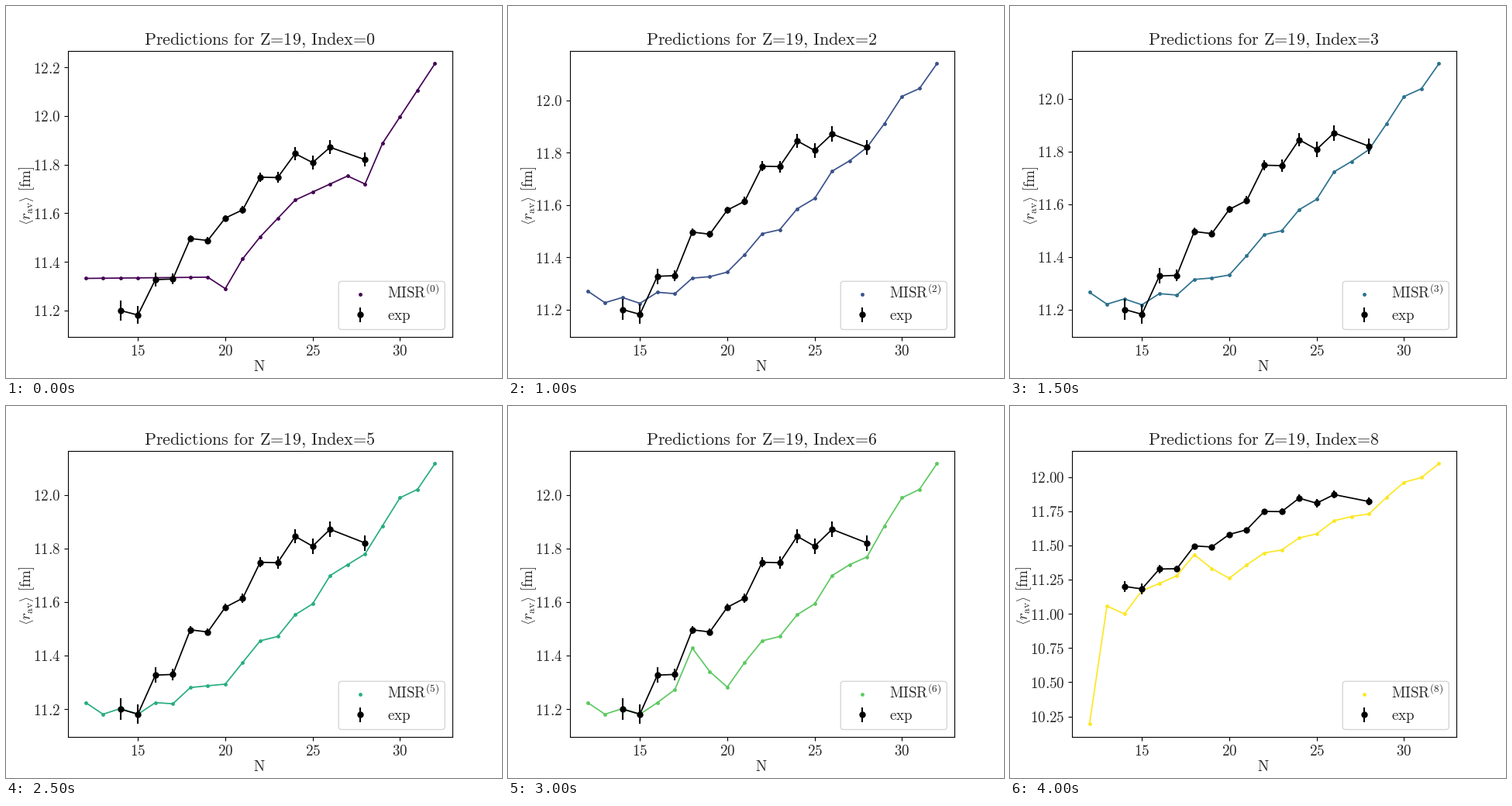
A matplotlib script that plays this animation: 640 px wide and 480 px high, repeating every 4500 ms.

```python
import numpy as np
import matplotlib.pyplot as plt
from matplotlib.animation import FuncAnimation
from matplotlib.patches import FancyBboxPatch

INK = "0.15"  # softens the heavy rendering of the type
plt.rcParams.update({
    "font.size": 13.7, "mathtext.fontset": "cm", "text.color": INK,
    "xtick.labelcolor": INK, "ytick.labelcolor": INK,
    "lines.linewidth": 1.25,
})

W, H, DPI = 640, 480, 100
STEPS, INTERVAL = 9, 500
N = np.arange(12, 33)
MAGIC = (20, 28)


def roman(s):
    return r"$\text{%s}$" % s


def stagger(n, even_values, gap):
    """Join the even-N values and lower odd N by the pairing gap."""
    even = n[n % 2 == 0]
    return np.interp(n, even, even_values) - gap * (n % 2)


def measured():
    n = np.arange(14, 29)
    r = stagger(n, [11.2, 11.327, 11.496, 11.58, 11.748, 11.845, 11.871, 11.82],
                np.where(n < 18, 0.082, 0.05))
    err = np.interp(n, [14.5, 18, 20, 25], [0.041, 0.014, 0.013, 0.029])
    keep = n != 27
    return n[keep], r[keep], err[keep]


def predicted():
    """Curve for each index; every later one corrects the one before."""
    magic = np.isin(N, MAGIC)
    beside_magic = np.isin(N + 1, MAGIC) | np.isin(N - 1, MAGIC)

    c0 = np.interp(N, [12, 19, 20, 21, 22, 24, 27, 28, 29, 32],
                   [11.332, 11.337, 11.29, 11.413, 11.503,
                    11.654, 11.753, 11.72, 11.887, 12.2147])
    c2 = stagger(N, [11.271, 11.246, 11.266, 11.32, 11.343, 11.49,
                     11.585, 11.729, 11.82, 12.015, 12.14],
                 np.where(beside_magic, 0.006, 0.0325))
    fade = 0.5 * (1 - ((N - 12) / 20) ** 3)
    c1 = c0 + fade * (c2 - c0)
    c4 = c2 - 0.012 - 0.0125 * magic
    c3 = (c2 + c4) / 2
    c5 = c4 - np.linspace(0.034, 0.012, len(N))
    bump = 0.147 * np.clip(1 - 0.64 * abs(N - 18), 0, 1)
    c6 = c5 + bump - 0.011 * magic
    c7 = c6 + np.interp(N, [12, 13, 14, 15, 17, 20, 32],
                        [-1.026, -0.124, -0.207, -0.02, 0, 0, -0.037])
    c8 = c7 + np.interp(N, [12, 15, 18, 20, 24, 28, 32],
                        [-0.005, 0.008, 0.004, -0.023, 0.014, -0.0135, 0.018])
    return [c0, c1, c2, c3, c4, c5, c6, c7, c8]


exp_n, exp_r, exp_err = measured()
curves = predicted()

fig = plt.figure(figsize=(W / DPI, H / DPI), dpi=DPI, facecolor="white")
ax = fig.add_axes([0.125, 0.11, 0.775, 0.77])
ax.set_xlim(11, 33)
ax.set_xticks(range(15, 31, 5), [roman(n) for n in range(15, 31, 5)])
ax.tick_params(axis="x", pad=2.7)

bars = dict(fmt="o", color="black", ms=5, elinewidth=1.5)
line, = ax.plot(N, curves[0], zorder=2)
dots = ax.scatter(N, curves[0], s=4, lw=1.5, zorder=2)
ax.plot(exp_n, exp_r, color="black", zorder=3)
ax.errorbar(exp_n, exp_r, yerr=exp_err, zorder=4, **bars)

# Overlay in pixel coordinates for labels and legend
page = fig.add_axes([0, 0, 1, 1], zorder=5)
page.set_xlim(0, W)
page.set_ylim(H, 0)
page.axis("off")

title = page.text(327.3, 50, "", fontsize=15.9, ha="center")
page.text(326.5, 471, roman("N"), ha="center")
# Calligraphic h and i hold the text-size angle brackets
ylabel = page.text(32.6, 245,
                   r"$\mathcal{h} r_{\mathrm{av}}\mathcal{i}\text{ [fm]}$",
                   rotation=90, rotation_mode="anchor", ha="center")

page.add_patch(FancyBboxPatch((429.2, 355.3), 137.1, 62.2,
                              boxstyle="round,pad=0,rounding_size=3.9",
                              fc="white", ec="0.8", lw=1, alpha=0.8))
key_dot = page.scatter([457], [372], s=4, lw=1.5)
key_text = page.text(491.5, 377, "")
page.errorbar([457], [398.4], yerr=[9.7], **bars)
page.text(491.5, 405.2, roman("exp"))


def update(i):
    y = curves[i]
    color = plt.cm.viridis(i / (STEPS - 1))
    line.set_ydata(y)
    dots.set_offsets(np.column_stack([N, y]))
    for artist in (line, dots, key_dot):
        artist.set_color(color)

    lo = min(y.min(), (exp_r - exp_err).min())
    hi = max(y.max(), (exp_r + exp_err).max())
    pad = 0.05 * (hi - lo)
    lo, hi = lo - pad, hi + pad
    wide = hi - lo > 1.5
    step, digits = (0.25, 2) if wide else (0.2, 1)
    ticks = step * np.arange(np.ceil(lo / step), np.floor(hi / step) + 1)
    ax.set_yticks(ticks, [roman(f"{t:.{digits}f}") for t in ticks])
    ax.set_ylim(lo, hi)

    ylabel.set_x(23.1 if wide else 32.6)
    title.set_text(roman(f"Predictions for Z=19, Index={i}"))
    key_text.set_text(r"$\mathrm{MISR}^{(%d)}$" % i)
    return line, dots, key_dot, ylabel, title, key_text


anim = FuncAnimation(fig, update, frames=STEPS, interval=INTERVAL,
                     repeat=True, repeat_delay=0, blit=False)
plt.show()
```
